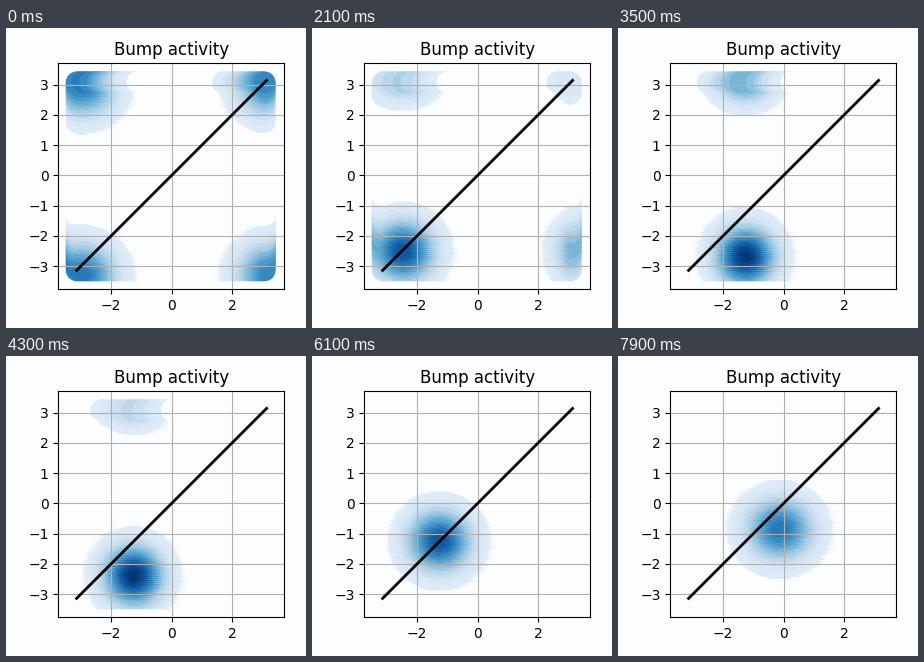
A matplotlib script for the animation above (8000 ms loop, 300 px wide and 300 px high).

```python
import numpy as np
import matplotlib.pyplot as plt
from matplotlib.animation import FuncAnimation
from matplotlib.colors import ListedColormap, to_rgba

FRAMES, STEP = 80, 100
LOOP = FRAMES * STEP
N = 100
LEVELS = 16
BG = "#fcfdff"


def ease(t, start, end):
    u = np.clip((t - start) / (end - start), 0, 1)
    return u * u * (3 - 2 * u)


def centre(t):
    """The bump drifts right in three moves and climbs in two."""
    x = (-2.87 + 0.48 * ease(t, 0, 1600) + 1.22 * ease(t, 2000, 3500)
         + 1.15 * ease(t, 6100, 8000))
    y = (-2.95 + 0.77 * ease(t, 800, 2100) - 0.21 * ease(t, 2100, 3500)
         + 1.86 * ease(t, 3200, 7300))
    return x, y


def wrap(d):
    return (d + np.pi) % (2 * np.pi) - np.pi


axis = np.linspace(-np.pi, np.pi, N, endpoint=False)
gx, gy = (g.ravel() for g in np.meshgrid(axis, axis))
points = np.column_stack([gx, gy])


def activity(t):
    cx, cy = centre(t)
    focus = np.sin(np.pi * t / LOOP) ** 2  # taller and narrower mid-loop
    dx = wrap(gx - cx) / (0.79 - 0.10 * focus)
    dy = wrap(gy - cy) / (0.74 - 0.04 * focus)
    return (0.74 + 0.25 * focus) * np.exp(-(dx ** 2 + dy ** 2) / 2)


blues = plt.get_cmap("Blues")
shades = blues((np.arange(LEVELS) + 0.5) / LEVELS)
shades[:2] = to_rgba(BG), blues(0.13)

fig = plt.figure(figsize=(3, 3), dpi=100, facecolor=BG)
ax = fig.add_axes((52.3 / 300, 38.6 / 300, 225.9 / 300, 226 / 300),
                  facecolor=BG)
dots = ax.scatter(gx, gy, c=activity(0), s=244, linewidths=0,
                  cmap=ListedColormap(shades), vmin=0, vmax=1)
ax.plot([-np.pi, np.pi], [-np.pi, np.pi], color="black", lw=2)
ax.set_xlim(-3.747, 3.724)
ax.set_ylim(-3.770, 3.704)
ax.set_xticks([-2, 0, 2])
ax.set_yticks(range(-3, 4))
ax.grid(True)
ax.set_title("Bump activity")


def update(k):
    level = activity(k * STEP)
    live = level > 0.002  # the rest blends into the background
    dots.set_offsets(points[live])
    dots.set_array(level[live])
    return (dots,)


anim = FuncAnimation(fig, update, frames=FRAMES, interval=STEP,
                     repeat=True, repeat_delay=0)
plt.show()
```
